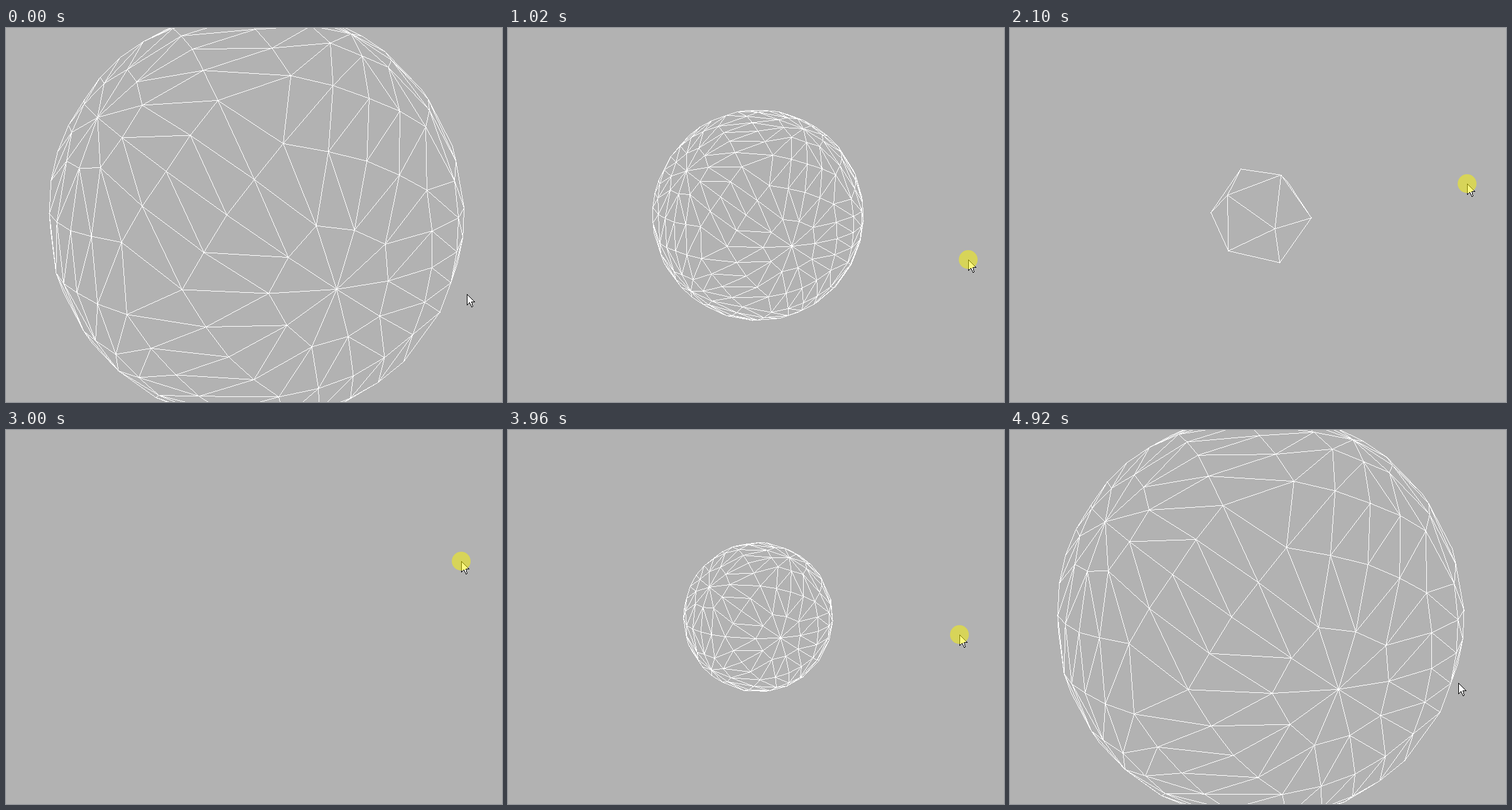
An HTML page with a canvas for the animation above (5.16 s loop, 790 px wide and 596 px high).

```html
<!DOCTYPE html>
<html lang="en">
<head>
<meta charset="utf-8">
<title>Sphere level of detail</title>
<style>
  html, body { margin: 0; width: 100%; height: 100%; overflow: hidden; background: #b2b2b2; }
  canvas { display: block; }
</style>
</head>
<body>
<canvas id="stage" width="790" height="596"></canvas>
<script>
const ctx = document.getElementById('stage').getContext('2d');
const LOOP = 5160, STEP = 60, FOCAL = 718, CENTER = [397.75, 297.75];

// time, camera distance, pointer x, pointer y
const KEYS = [
  [0, 2.384, 734, 424], [240, 2.384, 734, 424], [720, 3.722, 734, 387],
  [1260, 4.92, 733, 354], [1380, 5.605, 732, 334], [1800, 7.5, 731, 284],
  [2100, 8.8, 728, 248], [2340, 9.7, 728, 222], [2580, 10.4, 726, 205],
  [2940, 10.4, 726, 205], [3000, 10.25, 725, 209], [3480, 8.6, 720, 258],
  [3960, 6.11, 719, 326], [4020, 5.72, 719, 334], [4560, 2.62, 715, 399],
  [4680, 2.424, 714, 403], [LOOP, 2.424, 714, 403]
];

const dot = (a, b) => a[0] * b[0] + a[1] * b[1] + a[2] * b[2];
const cross = (a, b) => [a[1] * b[2] - a[2] * b[1], a[2] * b[0] - a[0] * b[2], a[0] * b[1] - a[1] * b[0]];
const normalize = a => a.map(v => v / Math.hypot(...a));
const mix = (a, b, t) => a.map((v, i) => v + (b[i] - v) * t);

function icosahedron() {
  const axis = normalize([0.2591, 0.2383, 0.936]);
  const guide = [0.385, -0.7349, 0.5583];
  const u = normalize(guide.map((v, i) => v - axis[i] * dot(guide, axis)));
  const v = cross(axis, u);
  const half = [axis];
  for (let k = 0; k < 5; k++) {
    const angle = k * Math.PI * 0.4;
    half.push(axis.map((a, i) => (a + 2 * (u[i] * Math.cos(angle) + v[i] * Math.sin(angle))) / Math.sqrt(5)));
  }
  const points = half.concat(half.map(p => p.map(c => -c)));
  const adjacent = (a, b) => dot(a, b) > 0.4;
  const faces = [];
  points.forEach((a, i) => points.slice(i + 1).forEach((b, j) => {
    if (!adjacent(a, b)) return;
    for (const c of points.slice(i + j + 2)) {
      if (adjacent(a, c) && adjacent(b, c)) {
        faces.push(dot(a, cross(b, c)) < 0 ? [a, b, c] : [a, c, b]);
      }
    }
  }));
  return faces;
}

// Concentric rings, as a hardware tessellator builds them with equal spacing.
function tessellate(corners, level) {
  const triangles = [];
  const middle = corners[0].map((_, i) => (corners[0][i] + corners[1][i] + corners[2][i]) / 3);
  const ring = n => corners.map(c => mix(middle, c, n / level));
  for (let n = level; n > 0; n -= 2) {
    const outer = ring(n);
    if (n === 1) {
      triangles.push(outer);
      break;
    }
    const inner = ring(n - 2);
    for (let side = 0; side < 3; side++) {
      const next = (side + 1) % 3;
      const o = k => mix(outer[side], outer[next], k / n);
      const i = k => n > 2 ? mix(inner[side], inner[next], k / (n - 2)) : middle;
      triangles.push([o(0), o(1), i(0)], [o(n - 1), o(n), i(n - 2)]);
      for (let k = 1; k < n - 1; k++) {
        if (k < (n - 1) / 2) triangles.push([o(k), i(k), i(k - 1)], [o(k), o(k + 1), i(k)]);
        else triangles.push([o(k), o(k + 1), i(k - 1)], [o(k + 1), i(k), i(k - 1)]);
      }
    }
  }
  return triangles.map(t => t.map(normalize));
}

const faces = icosahedron();
const meshes = [0, 1, 2, 3, 4, 5].map(level => faces.flatMap(face => tessellate(face, level)));

// One hard pixel per step along the longer axis.
function pixelLine(a, b) {
  const major = Math.abs(b[0] - a[0]) >= Math.abs(b[1] - a[1]) ? 0 : 1;
  const [p, q] = a[major] <= b[major] ? [a, b] : [b, a];
  const length = q[major] - p[major] || 1;
  for (let m = Math.round(p[major]); m <= Math.round(q[major]); m++) {
    const n = Math.round(mix(p, q, (m - p[major]) / length)[1 - major]);
    if (major === 0) ctx.fillRect(m, n, 1, 1);
    else ctx.fillRect(n, m, 1, 1);
  }
}

const outline = points => points.forEach((p, i) => pixelLine(p, points[(i + 1) % points.length]));

function drawSphere(distance) {
  const level = Math.max(0, Math.min(5, Math.ceil((10 - distance) * 0.79)));
  const project = p => [0, 1].map(i => CENTER[i] + p[i] * FOCAL / (distance - p[2]));
  ctx.fillStyle = '#fff';
  for (const triangle of meshes[level]) {
    const [p, q, r] = triangle;
    const normal = cross(mix(q, p, 1).map((v, i) => q[i] - v), r.map((v, i) => v - p[i]));
    const towardCamera = [-p[0], -p[1], distance - p[2]];
    if (dot(normal, towardCamera) < 0) outline(triangle.map(project));
  }
}

function drawPointer(x, y, pressed) {
  const arrow = [[0, 0], [0, 17], [4, 13], [7, 20], [9, 19], [7, 12], [12, 12]]
    .map(([dx, dy]) => [x + dx, y + dy]);
  ctx.fillStyle = '#fff';
  ctx.beginPath();
  arrow.forEach(([px, py]) => ctx.lineTo(px + 0.5, py + 0.5));
  ctx.fill();
  ctx.fillStyle = '#000';
  outline(arrow);
  if (pressed) {
    ctx.fillStyle = 'rgba(252, 246, 0, 0.5)';
    ctx.beginPath();
    ctx.arc(x, y, 15, 0, Math.PI * 2);
    ctx.fill();
  }
}

function poseAt(time) {
  const k = KEYS.findIndex(key => key[0] > time);
  const from = KEYS[k - 1], to = KEYS[k];
  return mix(from, to, (time - from[0]) / (to[0] - from[0]));
}

function draw(time) {
  const [, distance, x, y] = poseAt(time);
  ctx.fillStyle = '#b2b2b2';
  ctx.fillRect(0, 0, 790, 596);
  drawSphere(distance);
  drawPointer(Math.round(x), Math.round(y), time >= 240 && time < 4920);
}

const start = performance.now();
let shown = -1;
function tick() {
  const elapsed = (performance.now() - start) % LOOP;
  const time = Math.floor(elapsed / STEP) * STEP;
  if (time !== shown) draw(shown = time);
  requestAnimationFrame(tick);
}
tick();
</script>
</body>
</html>
```
